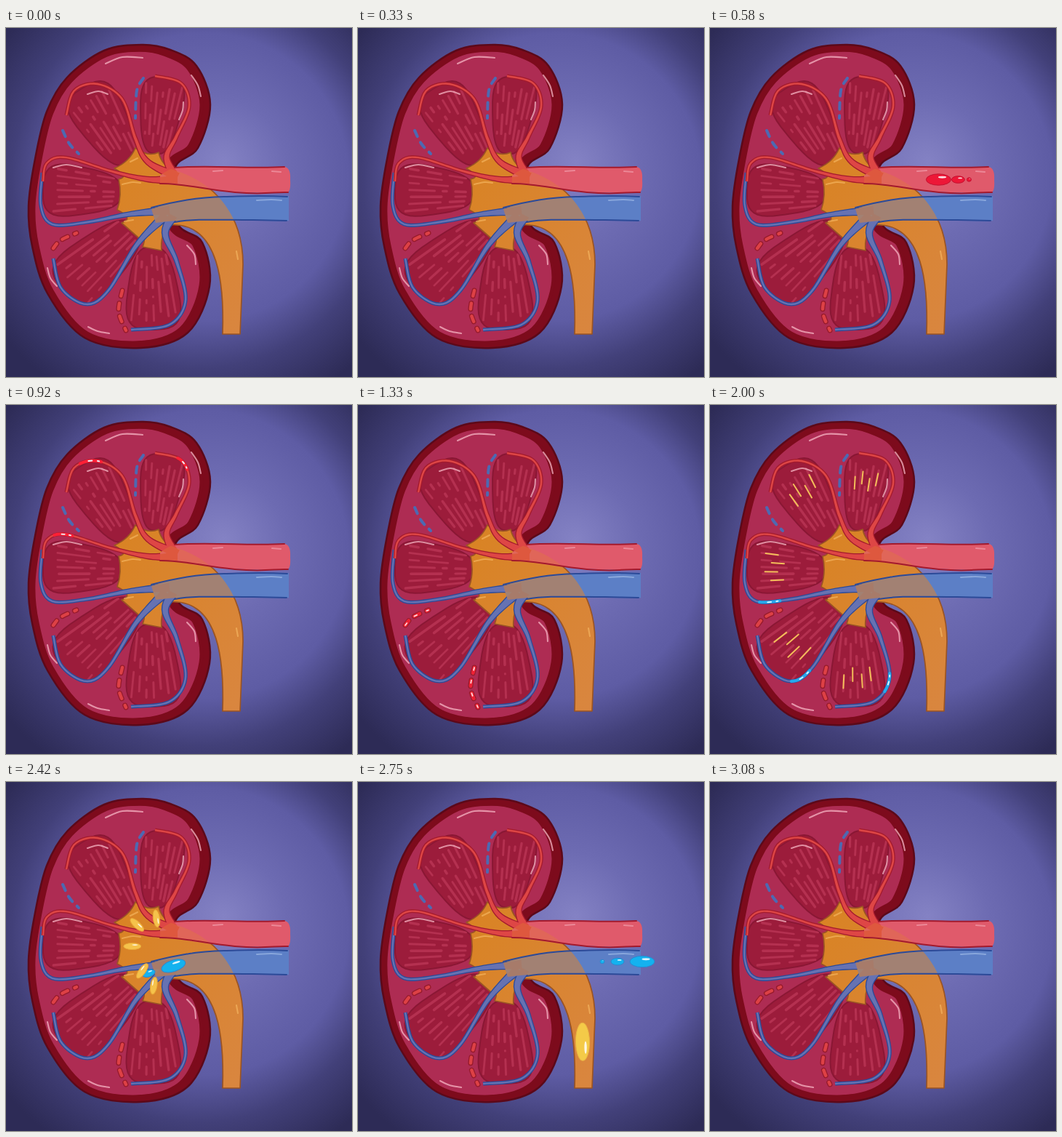
These frames come from a looping animation (476x480 px, 3.16 s). An HTML page:

```html
<!DOCTYPE html>
<html lang="en">
<head>
<meta charset="utf-8">
<title>Kidney filtration</title>
<style>
html, body { margin: 0; width: 100%; height: 100%; overflow: hidden; background: #35325f; }
svg { display: block; width: 100vw; height: 100vh; }
path, line { stroke-linecap: round; stroke-linejoin: round; }
</style>
</head>
<body>
<svg id="stage" viewBox="0 0 476 480">
  <defs>
    <radialGradient id="sky" gradientUnits="userSpaceOnUse" cx="255" cy="218" r="330" fx="300" fy="185">
      <stop offset="0" stop-color="#8482c4"/><stop offset=".3" stop-color="#6d6bb2"/>
      <stop offset=".6" stop-color="#5e5ca4"/><stop offset=".78" stop-color="#424079"/>
      <stop offset="1" stop-color="#2d2b56"/>
    </radialGradient>
    <linearGradient id="urine" x1="0" y1="0" x2="1" y2="1">
      <stop offset="0" stop-color="#d98322"/><stop offset="1" stop-color="#d98640"/>
    </linearGradient>
  </defs>
  <rect width="476" height="480" fill="url(#sky)"/>
</svg>
<script>
const NS = 'http://www.w3.org/2000/svg';
const stage = document.getElementById('stage');
const LOOP = 3160, STEP = 1000 / 12;

function add(tag, attrs, parent = stage) {
  const el = document.createElementNS(NS, tag);
  for (const key in attrs) el.setAttribute(key, attrs[key]);
  return parent.appendChild(el);
}

const lerp = (a, b, k) => a + (b - a) * k;
const show = (el, visible) => el.setAttribute('display', visible ? 'inline' : 'none');
const fill = (d, color, extra = {}) => add('path', { d, fill: color, ...extra });
const stroke = (d, color, width, extra = {}) =>
  add('path', { d, fill: 'none', stroke: color, 'stroke-width': width, ...extra });
const clip = (id, d) => add('path', { d }, add('clipPath', { id }));

let seed = 7;
const random = () => (seed = seed * 16807 % 2147483647) / 2147483647;

// Smooth curve through "x,y x,y ..."
function curve(text, closed) {
  const p = text.split(' ').map(s => s.split(',').map(Number)), n = p.length;
  const at = i => closed ? p[(i + n) % n] : p[Math.max(0, Math.min(n - 1, i))];
  let d = 'M' + p[0];
  for (let i = 0; i < n - (closed ? 0 : 1); i++) {
    const [a, b, c, e] = [at(i - 1), at(i), at(i + 1), at(i + 2)];
    const near = [0, 1].map(k => b[k] + (c[k] - a[k]) / 6);
    const far = [0, 1].map(k => c[k] - (e[k] - b[k]) / 6);
    d += `C${near} ${far} ${c}`;
  }
  return closed ? d + 'Z' : d;
}

// Ribbon along a curve that widens towards its end
function taper(d, from, to) {
  const path = stroke(d, 'none', 0), length = path.getTotalLength(), n = 50;
  const left = [], right = [];
  for (let i = 0; i <= n; i++) {
    const s = length * i / n, w = lerp(from, to, (i / n) ** 5) / 2;
    const p = path.getPointAtLength(s);
    const a = path.getPointAtLength(s - 1), b = path.getPointAtLength(s + 1);
    const h = Math.hypot(b.x - a.x, b.y - a.y);
    const nx = (a.y - b.y) / h * w, ny = (b.x - a.x) / h * w;
    left.push([p.x + nx, p.y + ny]);
    right.unshift([p.x - nx, p.y - ny]);
  }
  path.remove();
  return 'M' + [...left, ...right].join('L') + 'Z';
}

const shine = (points, opacity = .75, color = '#f7b6c4') =>
  stroke(curve(points), color, 2.1, { opacity });

// Kidney body, with a rim that is thicker on the right
const body = curve('187,23 135,31 84,68 56,115 40,180 31,245 36,300 57,365 108,426 185,440 250,419 280,355 270,295 236,268 232,194 264,165 281,105 262,52 226,30', true);
clip('inside', body);
fill(body, '#ae2c53');
const rim = add('g', { 'clip-path': 'url(#inside)' });
for (const shift of [-5, 0])
  rim.append(stroke(body, '#7d0b1c', 19, { transform: `translate(${shift} 0)` }));
stroke(body, '#5c0919', 2.5);

// Pyramid: rounded wedge from rim to tip
function pyramid([x0, y0, x1, y1, half], index) {
  const length = Math.hypot(x1 - x0, y1 - y0);
  const point = (s, u) => {
    const w = u * half * (1 - .45 * s) / length;
    return [lerp(x0, x1, s) - (y1 - y0) * w, lerp(y0, y1, s) + (x1 - x0) * w];
  };
  const outline = [];
  for (let i = 0; i < 40; i++) {
    const a = i / 40 * 2 * Math.PI;
    const round = v => Math.sign(v) * Math.abs(v) ** .65;
    outline.push(point((1 - round(Math.cos(a))) / 2, round(Math.sin(a))));
  }
  const d = 'M' + outline.join('L') + 'Z';
  clip('cone' + index, d);
  fill(d, '#9c1c3b', { stroke: '#8a1734', 'stroke-width': 2 });
  return { point, tip: [x1, y1], group: add('g', { 'clip-path': `url(#cone${index})` }) };
}

function place(line, point, u, from, to) {
  const [x1, y1] = point(from, u), [x2, y2] = point(to, u);
  Object.entries({ x1, y1, x2, y2 }).forEach(([k, v]) => line.setAttribute(k, v.toFixed(1)));
}

const pyramids = [
  [219, 68, 205, 173, 35], [106, 82, 168, 185, 42], [51, 222, 159, 226, 42],
  [80, 362, 178, 273, 47], [204, 415, 200, 301, 44]
].map(pyramid);

pyramids.forEach(({ point, group }) => {
  for (let u = -.75; u < .8; u += .25) {
    let s = .1 + random() * .12;
    while (s < .8) {
      const end = Math.min(.9, s + random() * .45);
      place(add('line', { stroke: '#b43050', 'stroke-width': 2.6 + random() }, group), point, u, s, end);
      s = end + .1 + random() * .08;
    }
  }
});

const filtrate = pyramids.flatMap(({ point, group }) => [-.5, -.17, .17, .5].map((u, i) => ({
  point, u, lag: i % 2 * .08,
  line: add('line', { stroke: '#f3bd59', 'stroke-width': 2 }, group)
})));

// Renal pelvis and ureter
const pelvis = 'M149 193Q170 184 178 165Q195 178 210 171Q214 190 233 196C285 212 326 255 326 325L322 421H298C300 360 296 265 224 271Q212 284 214 306L188 301Q194 285 184 290L159 268Q177 262 153 250Q160 230 155 208Q170 205 149 193Z';
fill(pelvis, 'url(#urine)', { stroke: '#9a5424', 'stroke-width': 1.7 });
for (const spot of ['160,215 174,212 185,213', '163,266 175,264', '171,184 181,179', '317,307 319,318'])
  shine(spot, .6, '#f8bc68');

// A trunk and its branches share one outline; the pelvis shows through the trunk
function vessel(id, trunk, edges, branches, dark, light, trunkColor, through) {
  const paths = branches.map(b => curve(b));
  paths.forEach(d => fill(taper(d, 5, 15), dark));
  fill(trunk, trunkColor);
  paths.forEach(d => fill(taper(d, 2.4, 12.4), light));
  clip(id, trunk);
  fill(pelvis, '#dd8330', { opacity: through, 'clip-path': `url(#${id})` });
  edges.forEach(d => stroke(d, dark, 2));
  return paths;
}

const veins = vessel('veinTrunk',
  'M200 249C235 238 262 233 300 232S350 230 389 231V265C340 266 290 263 260 264Q235 264 206 268Z',
  ['M200 247C235 238 262 233 300 232S350 230 387 232', 'M232 267C260 262 290 264 340 264T386 265'],
  ['50,199 48,245 64,270 112,267 170,256 225,251',
    '65,317 76,358 110,380 140,362 180,298 220,257',
    '172,415 225,408 247,375 235,322 219,283 230,258'],
  '#2c4a98', '#6672b2', '#5c7fc6', .55);

const arteries = vessel('arteryTrunk',
  'M212 203Q228 190 240 191C282 188 333 193 383 191Q392 192 391 209Q392 225 387 226C337 228 283 224 251 218Q228 214 212 213Z',
  ['M232 192C280 188 333 194 383 191', 'M212 214C249 214 270 222 315 226S367 225 388 226'],
  ['83,120 94,86 126,77 160,98 178,152 195,184 236,205',
    '205,66 241,76 252,108 234,150 221,177 231,202',
    '51,211 56,186 82,178 145,197 195,208 236,208'],
  '#a31a2d', '#de4645', '#e05a6b', .3);

shine('285,197 298,196', .5);
shine('366,197 378,198', .5);
shine('345,237 365,236 379,237', .5, '#b4cdf2');

// Vessels that pass behind tissue show as dashes
const dashed = (points, color, width, dash) =>
  stroke(curve(points), color, width, { 'stroke-dasharray': dash });
const blueArcs = ['189,69 180,86 178,124', '78,141 87,159 100,173'];
const redArcs = ['65,303 75,292 97,282', '160,361 155,390 165,416'];
const BLUE_DASH = '9 9', RED_DASH = '8 10';
blueArcs.forEach(p => dashed(p, '#4d69b2', 4, BLUE_DASH));
redArcs.forEach(p => {
  dashed(p, '#971a2b', 7, RED_DASH);
  dashed(p, '#dd4145', 4.4, RED_DASH);
});

for (const gloss of ['137,49 160,40 188,41', '255,65 264,79 268,94', '57,330 61,344 70,355',
  '113,411 126,417 142,420', '249,299 259,311 261,325', '112,91 127,87 140,91',
  '244,102 243,113 238,126', '65,192 83,188 104,192']) shine(gloss);

// Light with sparkles, travelling along a branch
function glint(d, color, start, end) {
  const span = .12, group = add('g', {});
  const lines = [
    stroke(d, color, 4, { pathLength: 1, 'stroke-dasharray': `${span} 4` }),
    stroke(d, '#e4f7ff', 1.8, { pathLength: 1, 'stroke-dasharray': '.02 .03 .01 4' })
  ];
  group.append(...lines);
  return t => {
    show(group, t >= start && t < end);
    const head = lerp(-span, 1, (t - start) / (end - start));
    lines.forEach((line, i) => line.setAttribute('stroke-dashoffset', -head - i * span * .4));
  };
}

function flash(points, color, dash, start, end) {
  const group = add('g', {});
  group.append(dashed(points, color, 4.4, dash), dashed(points, '#ffe9ec', 1.6, '4 5'));
  group.lastChild.setAttribute('stroke-dasharray', dash.replace(/^\d+/, n => n / 2)
    .replace(/\d+$/, n => +n + (parseInt(dash) / 2)));
  return t => show(group, t >= start && t < end);
}

const effects = [
  ...arteries.map(d => glint(d, '#ff2036', 790, 1260)),
  ...redArcs.map(p => flash(p, '#ef2034', RED_DASH, 1240, 1490)),
  ...blueArcs.map(p => flash(p, '#4ab8ef', BLUE_DASH, 1660, 1900)),
  ...veins.map(d => glint(d, '#27a9ec', 1722, 2400))
];

function cell(rx, ry, color, edge) {
  const group = add('g', {});
  add('ellipse', { rx, ry, fill: color, stroke: edge, 'stroke-width': 1 }, group);
  add('ellipse', { cx: rx * .3, cy: -ry * .42, rx: rx * .33, ry: ry * .18, fill: '#fff', opacity: .85 }, group);
  return group;
}

const move = (el, x, y, angle = 0) =>
  el.setAttribute('transform', `translate(${x} ${y}) rotate(${angle})`);
const degrees = (dx, dy) => Math.atan2(dy, dx) * 180 / Math.PI;

// Three cells of falling size, trailing behind the first
const train = (gaps, color, edge) => [17, 9, 3].map((rx, i) =>
  ({ gap: gaps[i], el: cell(rx, rx * .36 + 1.6, color, edge) }));
const redCells = train([0, 27, 42], '#ed1737', '#c31130');
const blueCells = train([0, -34, -55], '#14b2ef', '#2989d1');

const HUB = [212, 226];
const calyxDrops = pyramids.map(({ tip }) => ({ tip, el: cell(12, 4.6, '#f5c24b', '#e7a537') }));
const ureter = stroke(curve('220,222 275,248 308,320 309,355 310,480'), 'none', 1);
const urineDrop = cell(26, 9.5, '#f4ca48', '#e9b344');

function render(t) {
  effects.forEach(effect => effect(t));

  filtrate.forEach(({ line, point, u, lag }) => {
    const s = .23 + lag + (t - 2000) / 550;
    const from = Math.max(.06, s), to = Math.min(.98, s + .16);
    show(line, t > 1740 && to > from);
    place(line, point, u, from, to);
  });

  redCells.forEach(({ gap, el }) => {
    const x = 316 - (t - 580) * .48 + gap;
    show(el, x > 224 && x < 415);
    move(el, x, 208.5);
  });

  blueCells.forEach(({ gap, el }) => {
    const x = 391 + (t - 2750) * .482 + gap;
    show(el, t > 2320 && x > 176 && x < 415);
    move(el, x, 247 + Math.max(0, 250 - x) * .3, x < 260 ? -18 : 0);
  });

  const inflow = .28 + (t - 2417) / 250;
  calyxDrops.forEach(({ tip: [x, y], el }) => {
    show(el, inflow > -.1 && inflow < .9);
    move(el, lerp(x, HUB[0], inflow), lerp(y, HUB[1], inflow), degrees(HUB[0] - x, HUB[1] - y));
  });

  const along = 179 + (t - 2750) * .52;
  const here = ureter.getPointAtLength(along), ahead = ureter.getPointAtLength(along + 2);
  show(urineDrop, t > 2550 && t < 2990);
  move(urineDrop, here.x, here.y, degrees(ahead.x - here.x, ahead.y - here.y));
}

const began = performance.now();
function tick() {
  const t = (performance.now() - began) % LOOP;
  render(Math.floor((t + 4) / STEP) * STEP);
  requestAnimationFrame(tick);
}
tick();
</script>
</body>
</html>
```
